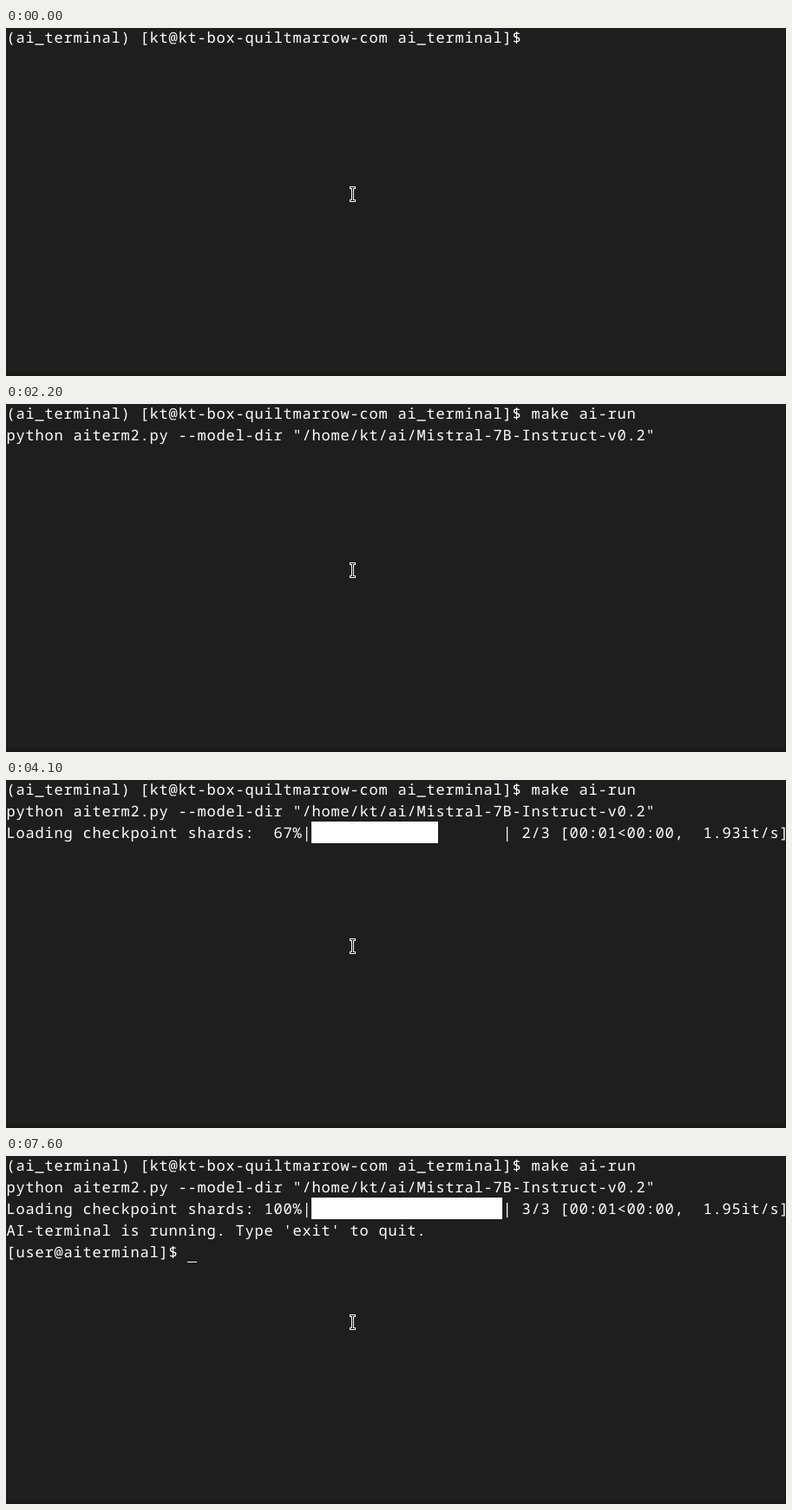
These frames come from a looping animation (899 by 402 pixels, 8 s). An HTML page:

```html
<!DOCTYPE html>
<html lang="en">
<head>
<meta charset="utf-8">
<title>Terminal session</title>
<style>
  html, body { margin: 0; width: 100%; height: 100%; overflow: hidden; background: #1e1e1e; }
  #stage { position: relative; width: 899px; height: 402px; overflow: hidden; background: #1e1e1e; }
  .row {
    position: absolute; left: 0; height: 25px; white-space: pre; color: #fff;
    font: 17px/25px "Noto Sans Mono", "DejaVu Sans Mono", monospace;
    font-variant-ligatures: none; text-rendering: geometricPrecision;
  }
  #bar, #caret { position: absolute; background: #fff; }
  #bar { left: 352px; top: 48px; height: 25px; }
  #caret { width: 11px; height: 1px; }
  #pointer { position: absolute; left: 0; top: 0; }
  .edge { position: absolute; right: 0; bottom: 0; background: #191919; }
</style>
</head>
<body>
<div id="stage">
  <div id="bar"></div>
  <div id="caret"></div>
  <svg id="pointer" width="899" height="402" fill="none">
    <path d="M396 184.5H403M399.5 184V200M396 199.5H403" stroke="#fff" stroke-width="3"/>
    <path d="M397 184.5H402M399.5 184V200M397 199.5H402" stroke="#111" stroke-width="1"/>
  </svg>
  <div class="edge" style="width:899px;height:4px"></div>
  <div class="edge" style="width:1px;height:402px"></div>
</div>
<script>
const LOOP = 8000, CELL = 11, LINE = 25, TOP = -2;
const PROMPT = '(ai_terminal) [kt@kt-box-quiltmarrow-com ai_terminal]$ ';
const COMMAND = 'make ai-run ';
const PYTHON = 'python aiterm2.py --model-dir "/home/kt/ai/Mistral-7B-Instruct-v0.2"';

const stage = document.getElementById('stage');
const bar = document.getElementById('bar');
const caret = document.getElementById('caret');

const rows = Array.from({ length: 5 }, (_, i) => {
  const row = document.createElement('div');
  row.className = 'row';
  row.style.top = TOP + i * LINE + 'px';
  return stage.insertBefore(row, bar);
});

// Letter spacing that puts the font on the terminal's cell grid
function fitGrid() {
  rows[0].textContent = 'm'.repeat(80);
  const gap = CELL - rows[0].getBoundingClientRect().width / 80;
  for (const row of rows) {
    row.style.letterSpacing = gap + 'px';
    row.style.left = gap / 2 + 'px';
  }
}

// [time, characters typed]
const typing = [[0, 0], [300, 1], [400, 2], [500, 3], [600, 4],
  [800, 5], [900, 6], [1000, 7], [1200, 12]];

// [time, percent, gap in columns, status, filled pixels]
const loading = [
  [3100, 0, 28, '0/3 [00:00<?, ?it/s]', 0],
  [3600, 33, 20, '1/3 [00:00<00:01,  1.90it/s]', 72],
  [4100, 67, 20, '2/3 [00:01<00:00,  1.93it/s]', 146],
  [4600, 100, 20, '3/3 [00:01<00:00,  1.95it/s]', 220]
];

// [time, row, column]; row -1 hides the caret
const carets = [[1700, 2, 0], [2200, -1], [2800, 2, 0], [3100, -1],
  [4600, 3, 0], [4700, -1], [5200, 3, 0], [5800, -1], [6400, 3, 0],
  [7000, -1], [7600, 4, 19]];

const latest = (steps, t) => steps.filter(s => s[0] <= t).pop();

function setText(i, text) {
  if (rows[i].textContent !== text) rows[i].textContent = text;
}

function render(t) {
  const typed = latest(typing, t)[1];
  setText(0, PROMPT + COMMAND.slice(0, typed));
  setText(1, t >= 1700 ? PYTHON : '');

  const load = latest(loading, t);
  if (load) {
    const [, percent, gap, status, fill] = load;
    setText(2, 'Loading checkpoint shards: ' + String(percent).padStart(3) +
      '%|' + ' '.repeat(gap) + '| ' + status);
    bar.style.width = fill + 'px';
  } else {
    setText(2, '');
    bar.style.width = '0';
  }

  const ready = t >= 7000;
  setText(3, ready ? "AI-terminal is running. Type 'exit' to quit." : '');
  setText(4, ready ? '[user@aiterminal]$ ' : '');

  const [, row, col] = latest(carets, t) ||
    [0, typed ? 0 : -1, PROMPT.length + typed];
  caret.style.display = row < 0 ? 'none' : 'block';
  if (row >= 0) {
    caret.style.left = col * CELL + 'px';
    caret.style.top = TOP + row * LINE + 24 + 'px';
  }
}

fitGrid();
const start = performance.now();
function tick() {
  render((performance.now() - start) % LOOP);
  requestAnimationFrame(tick);
}
tick();
</script>
</body>
</html>
```
